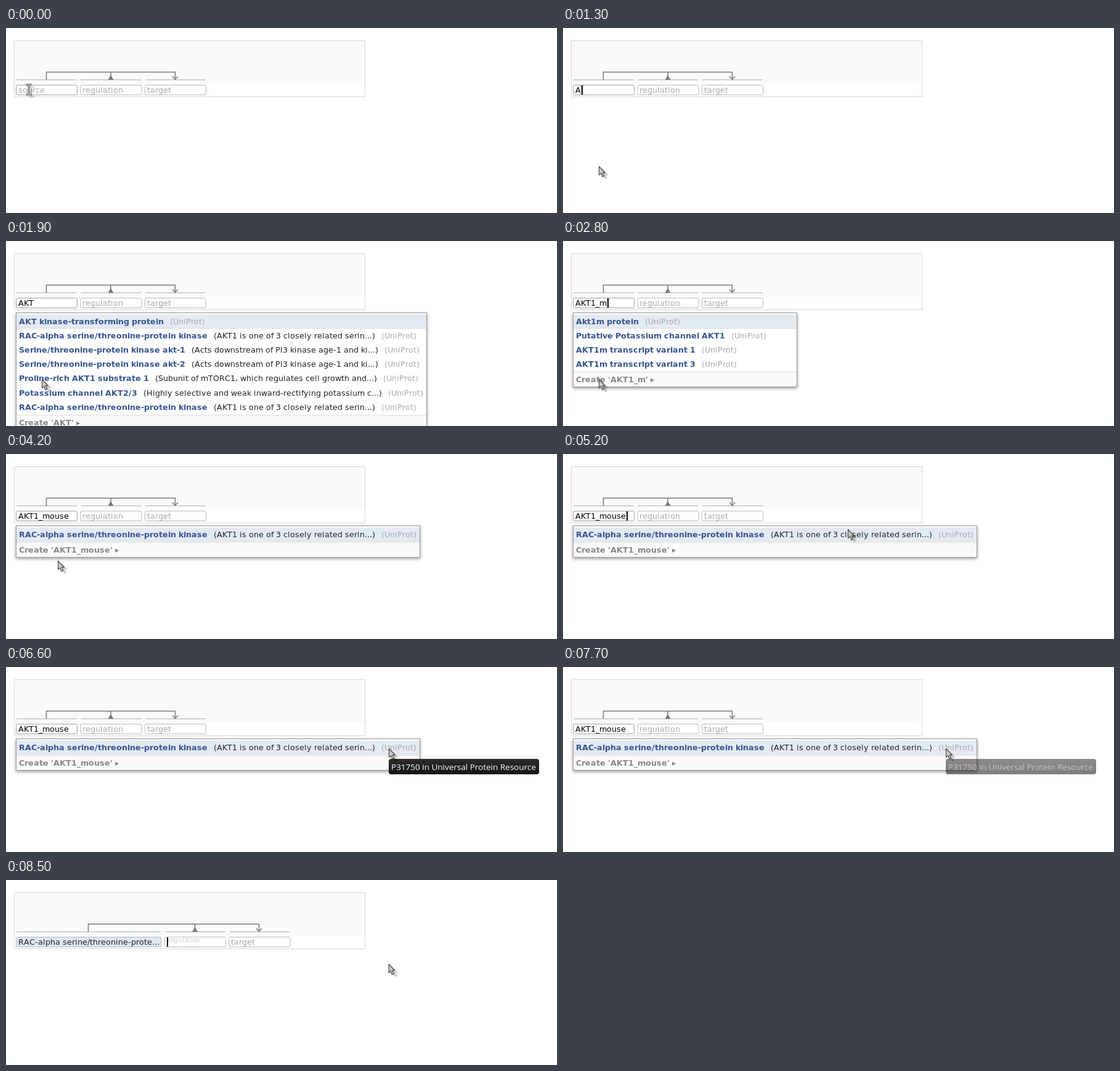
These frames come from a looping animation (894 by 300 pixels, 8.6 s). An HTML page with a canvas:

```html
<!DOCTYPE html>
<html lang="en">
<head>
<meta charset="utf-8">
<title>Term autocomplete</title>
<style>
html, body { margin: 0; width: 100%; height: 100%; overflow: hidden; background: #fff; }
canvas { display: block; }
</style>
</head>
<body>
<canvas id="stage" width="894" height="300"></canvas>
<script>
const LOOP = 8600, STEP = 100;
const ctx = document.getElementById('stage').getContext('2d');
const FONT = '12.7px "DejaVu Sans", sans-serif';
const BOLD = 'bold ' + FONT;
const SMALL = '10.4px "DejaVu Sans", sans-serif';
const TIP = '13.5px "Open Sans", sans-serif';

// Each term: [title, description]
const rac = ['RAC-alpha serine/threonine-protein kinase', '(AKT1 is one of 3 closely related serin...)'];
const akt1 = ['Serine/threonine-protein kinase akt-1', '(Acts downstream of PI3 kinase age-1 and ki...)'];
const akt2 = ['Serine/threonine-protein kinase akt-2', akt1[1]];
const proline = ['Proline-rich AKT1 substrate 1', '(Subunit of mTORC1, which regulates cell growth and...)'];
const channel = ['Potassium channel AKT2/3', '(Highly selective and weak inward-rectifying potassium c...)'];
const transforming = ['AKT kinase-transforming protein'];
const amyloid = ['Amyloid-beta A4 protein', '(Functions as a cell surface receptor and performs physi...)'];
const anchor = ['A-kinase anchor protein 1', '(Binds to type I and II regulatory subunits of protein...)'];
const actin = ['Actin, cytoplasmic 1', '(Highly conserved protein that polymerizes to produce filame...)'];

// Suggestions: [from ms, rows, least right edge]
const LISTS = [
  [1400, [['A protein'], amyloid, actin, anchor, ['Agouti-signaling protein'], channel, rac], 698],
  [1700, [['AK protein'], anchor, rac, akt1, proline, channel, akt2], 702],
  [1900, [transforming, rac, akt1, akt2, proline, channel, rac], 680],
  [2300, [rac, proline, akt1, akt2, transforming, channel, rac], 680],
  [2800, [['Akt1m protein'], ['Putative Potassium channel AKT1'], ['AKT1m transcript variant 1'], ['AKT1m transcript variant 3']], 380],
  [3000, [rac], 380]
];
const TYPED = [[0, ''], [1300, 'A'], [1600, 'AK'], [1900, 'AKT'], [2200, 'AKT1'], [2500, 'AKT1_'],
  [2700, 'AKT1_m'], [2900, 'AKT1_mo'], [3100, 'AKT1_mou'], [3300, 'AKT1_mous'], [3500, 'AKT1_mouse']];
const PATH = [[0, 37, 100], [200, 37, 100], [600, 58, 224], [3900, 58, 224], [4200, 84, 173],
  [4500, 190, 122], [4800, 330, 105], [5200, 462, 122], [5700, 594, 129], [6000, 621, 132],
  [8400, 621, 132], [8500, 620.5, 136], [LOOP, 620.5, 136]];
const CARET = [[300, 1900], [2000, 3500], [4900, 6500]];
const SELECT = 7800, FOCUS_NEXT = 7900, GAP = 10;

const latest = (list, t) => list.filter(item => item[0] <= t).pop();

function pointer(t) {
  const i = PATH.findIndex(p => p[0] > t);
  const [t0, x0, y0] = PATH[i - 1], [t1, x1, y1] = PATH[i];
  const k = (t - t0) / (t1 - t0);
  return [x0 + (x1 - x0) * k, y0 + (y1 - y0) * k];
}

// Screen-hinted text: every glyph advances by whole pixels
const advance = char => Math.round(ctx.measureText(char).width);

function text(string, x, y, color, font = FONT) {
  ctx.font = font;
  ctx.fillStyle = color;
  for (const char of string) {
    ctx.fillText(char, x, y);
    x += advance(char);
  }
  return x;
}

function widthOf(string, font) {
  ctx.font = font;
  return [...string].reduce((sum, char) => sum + advance(char), 0);
}

function rect(x, y, w, h, color) {
  ctx.fillStyle = color;
  ctx.fillRect(x, y, w, h);
}

function line(points, color, width) {
  ctx.beginPath();
  points.forEach(([x, y]) => ctx.lineTo(x, y));
  ctx.strokeStyle = color;
  ctx.lineWidth = width;
  ctx.stroke();
}

function rounded(x, y, w, h, r, fill, stroke) {
  ctx.beginPath();
  ctx.roundRect(x, y, w, h, r);
  ctx.fillStyle = fill;
  ctx.fill();
  if (!stroke) return;
  ctx.strokeStyle = stroke;
  ctx.lineWidth = 1;
  ctx.stroke();
}

function field(x, w, label, focused, border = '#bbb') {
  rounded(x + .5, 92.5, w - 1, 16, 2, '#fff', border);
  if (focused) text(label, Math.floor(x + 5), 101, '#ccc', SMALL);
  else if (label) text(label, Math.floor(x + 4), 105, '#aaa');
}

function panel(t) {
  const selected = t >= SELECT;
  const w = selected ? 236.5 : 100;
  const x2 = 20.5 + w, x3 = x2 + 104.5;
  rect(13, 20, 570, 92, '#d5d9d9');
  rect(14, 21, 568, 90, '#fff');
  rect(14, 21, 568, 69, '#fafafa');

  [[16, w], [x2, 100], [x3, 100]].forEach(([x, len]) => line([[x + 1, 84], [x + len - 1, 84]], '#aaa', 1));
  const a = 15.5 + Math.floor(w / 2), b = x2 + 49.5, c = Math.floor(x3 + 49) + .5;
  line([[a, 84], [a, 71.5], [c, 71.5], [c, 83]], '#777', 1.5);
  line([[b, 71.5], [b, 79]], '#777', 1.5);
  line([[c - 4.5, 78.5], [c, 83.5], [c + 4.5, 78.5]], '#777', 1.5);
  ctx.beginPath();
  ctx.moveTo(b, 76.5);
  ctx.lineTo(b + 4.5, 84);
  ctx.lineTo(b - 4.5, 84);
  ctx.fillStyle = '#777';
  ctx.fill();

  const typed = latest(TYPED, t)[1];
  if (selected) {
    rounded(16.5, 92.5, w - 1, 16, 2, '#dfe6f3', '#b4b9c4');
    text('RAC-alpha serine/threonine-prote...', 20, 105, '#222');
  } else {
    field(16, w, typed ? '' : 'source', t >= 300, '#a0a0a0');
    const end = text(typed, 20, 105, '#000');
    if (CARET.some(([on, off]) => t >= on && t < off)) rect(end + 1, 93, 2, 15, '#000');
  }
  field(x2, 100, 'regulation', t >= FOCUS_NEXT);
  field(x3, 100, 'target');
  if (t >= FOCUS_NEXT) rect(261, 93, 2, 15, '#000');
}

function popup(t, my) {
  const list = latest(LISTS, t);
  if (!list || t >= SELECT) return;
  const [, rows, least] = list;
  const rowWidth = ([title, note]) => widthOf(title, BOLD) + GAP +
    (note ? widthOf(note, FONT) + GAP : 0) + widthOf('(UniProt)', FONT);
  const right = Math.max(least, 27 + Math.max(...rows.map(rowWidth)));
  const w = right - 16, rowH = 23.1;
  const split = Math.round(119 + rows.length * rowH) + 1;

  ctx.save();
  ctx.shadowColor = 'rgba(0,0,0,.4)';
  ctx.shadowBlur = 5;
  ctx.shadowOffsetY = 2;
  rect(16, 116, w, split + 25 - 116, '#999');
  ctx.restore();
  rect(17, 117, w - 2, split - 117, '#fff');
  rect(17, split, w - 2, 24, '#fafafa');
  rect(17, split, w - 2, 1, '#ddd');

  const onCreate = t >= 4000 && my > 144 && my < 167;
  const top = onCreate ? split + 1 : 119;
  rect(17, top, w - 2, 22, '#e4eaf2');
  rect(17, top + 22, w - 2, 1, '#d3dae4');

  rows.forEach(([title, note], i) => {
    const y = Math.round(135 + i * rowH);
    let x = text(title, 21, y, '#375593', BOLD) + GAP;
    if (note) x = text(note, x, y, '#222') + GAP;
    text('(UniProt)', x, y, '#aaa');
  });
  text(`Create '${latest(TYPED, t)[1]}' ▸`, 21, split + 17, '#888', BOLD);
}

function tooltip(t) {
  if (t < 6500 || t >= SELECT) return;
  ctx.globalAlpha = t < 6600 || t >= 7700 ? .55 : 1;
  const shade = ctx.createLinearGradient(0, 149, 0, 174);
  shade.addColorStop(0, '#2e2c2b');
  shade.addColorStop(1, '#151414');
  rounded(621, 149, 244, 25, 4, shade);
  ctx.font = TIP;
  ctx.fillStyle = '#fff';
  ctx.fillText('P31750 in Universal Protein Resource', 625, 167);
  ctx.globalAlpha = 1;
}

const ARROW = new Path2D('M.5 .5V14.5L3.7 11.7L6.2 17.2L8.8 16L6.4 10.6H10.4Z');
const BEAM = new Path2D('M-4.5 -8H-2Q0 -8 0 -6V6Q0 8 -2 8H-4.5M4.5 -8H2Q0 -8 0 -6M0 6Q0 8 2 8H4.5');

function cursor(t, x, y) {
  const beam = t < 300;
  ctx.save();
  ctx.translate(x, y);
  ctx.lineJoin = 'round';
  // Soft drop shadow below the shape
  ctx.save();
  ctx.translate(4.5, 3.5);
  ctx.fillStyle = ctx.strokeStyle = 'rgba(0,0,0,.16)';
  ctx.lineWidth = beam ? 3 : 1;
  if (!beam) ctx.fill(ARROW);
  ctx.stroke(beam ? BEAM : ARROW);
  ctx.restore();
  ctx.strokeStyle = '#444';
  if (beam) {
    ctx.lineWidth = 3.2;
    ctx.stroke(BEAM);
    ctx.strokeStyle = '#ddd';
    ctx.lineWidth = 1.2;
    ctx.stroke(BEAM);
  } else {
    ctx.fillStyle = '#c8c8c8';
    ctx.fill(ARROW);
    ctx.lineWidth = 1.1;
    ctx.stroke(ARROW);
  }
  ctx.restore();
}

function draw(now) {
  const t = Math.floor(now % LOOP / STEP) * STEP;
  const [x, y] = pointer(t);
  rect(0, 0, 894, 300, '#fff');
  panel(t);
  popup(t, y);
  tooltip(t);
  cursor(t, x, y);
}

const start = performance.now();
function tick() {
  draw(performance.now() - start);
  requestAnimationFrame(tick);
}
tick();
</script>
</body>
</html>
```
